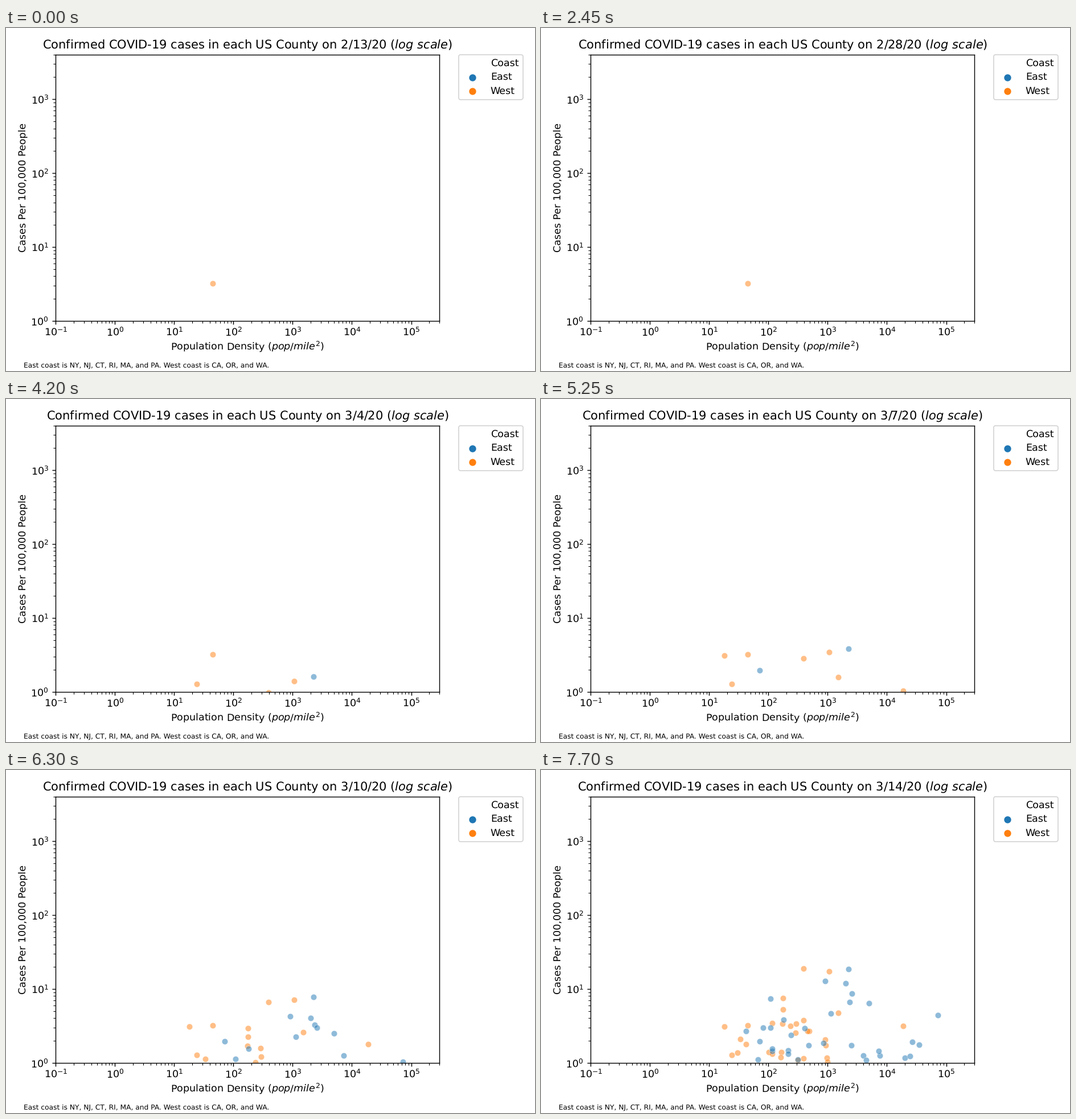
These frames come from a looping animation (929x603 px, 8 s). A matplotlib script:

```python
import numpy as np
import matplotlib.pyplot as plt
from matplotlib.animation import FuncAnimation
from matplotlib.lines import Line2D

W, H, DPI = 929, 603, 128
TICK_MS, DAY_MS, LOOP_MS = 50, 350, 8000
LAST = 22
BLUE, ORANGE = "#1f77b4", "#ff7f0e"

plt.rcParams.update({
    "font.family": "DejaVu Sans",
    "font.size": 9.84,
    "mathtext.fontset": "dejavusans",
    "text.hinting": "none",
    "xtick.major.pad": 2,
})

# First counties hit: density, first day, first rate, rate on the last day.
WEST = [
    (45.0, 0, 3.18, 3.18), (24.2, 10, 1.28, 1.28), (1061, 12, 1.38, 17.2),
    (394, 12, 0.97, 18.7), (1496, 13, 1.03, 4.7), (17.9, 15, 3.1, 3.1),
    (18850, 15, 1.02, 3.17),
]
EAST = [(2253, 12, 1.6, 18.4), (70.6, 14, 1.95, 1.95), (71900, 18, 1.03, 4.37)]

rng = np.random.default_rng(19)


def spread(n, low, mode, high):
    """Later counties: ever more new ones per day, each growing at its own pace."""
    density = 10 ** rng.triangular(low, mode, high, n)
    first = 16 + np.floor(7 * (rng.permutation(n) / n) ** 0.7)
    start = 10 ** rng.exponential(0.17, n)
    growth = 1 + rng.uniform(0, 0.35, n)
    return np.column_stack([density, first, start,
                            start * growth ** (LAST - first)])


def points(counties, day):
    density, first, start, end = counties[counties[:, 1] <= day].T
    t = (day - first) / np.maximum(LAST - first, 1)
    return np.column_stack([density, start * (end / start) ** t ** 0.85])


def date(day):
    if day > 8:
        return f"3/{day - 8}/20"
    return f"2/{21 + day if day else 13}/20"


fig = plt.figure(figsize=(W / DPI, H / DPI), dpi=DPI, facecolor="white")
left, right, top, bottom = 87.2, 761.2, 46.9, 514.6
ax = fig.add_axes([left / W, 1 - bottom / H,
                   (right - left) / W, (bottom - top) / H])
ax.set(xscale="log", yscale="log", xlim=(0.1, 3e5), ylim=(1, 4000))
ax.set_xlabel(r"Population Density ($pop/mile^2$)", labelpad=2.7)
ax.set_ylabel("Cases Per 100,000 People", labelpad=2.6)
title = ax.set_title("")
fig.text(30.8 / W, 1 - 597 / H,
         "East coast is NY, NJ, CT, RI, MA, and PA. "
         "West coast is CA, OR, and WA.", fontsize=6.89)


def dots(color):
    return ax.scatter([], [], s=35, color=color, alpha=0.5,
                      edgecolors="white", linewidths=0.48)


layers = [
    (dots(ORANGE), np.vstack([WEST, spread(23, 1.1, 2.4, 3.4)])),
    (dots(BLUE), np.vstack([EAST, spread(30, 1.4, 2.8, 4.8)])),
]

keys = [Line2D([], [], linestyle="none")]
keys += [ax.scatter([], [], s=35, color=c) for c in (BLUE, ORANGE)]
ax.legend(keys, ["Coast", "East", "West"], loc="upper left",
          bbox_to_anchor=(1.05, 1), borderaxespad=0, labelspacing=0.45)


def draw(i):
    day = min(i * TICK_MS // DAY_MS, LAST)
    title.set_text("Confirmed COVID-19 cases in each US County on "
                   + date(day) + r" ($log\ scale$)")
    for layer, counties in layers:
        layer.set_offsets(points(counties, day))
    return [title] + [layer for layer, _ in layers]


anim = FuncAnimation(fig, draw, frames=LOOP_MS // TICK_MS, interval=TICK_MS,
                     repeat=True, repeat_delay=0)
plt.show()
```
